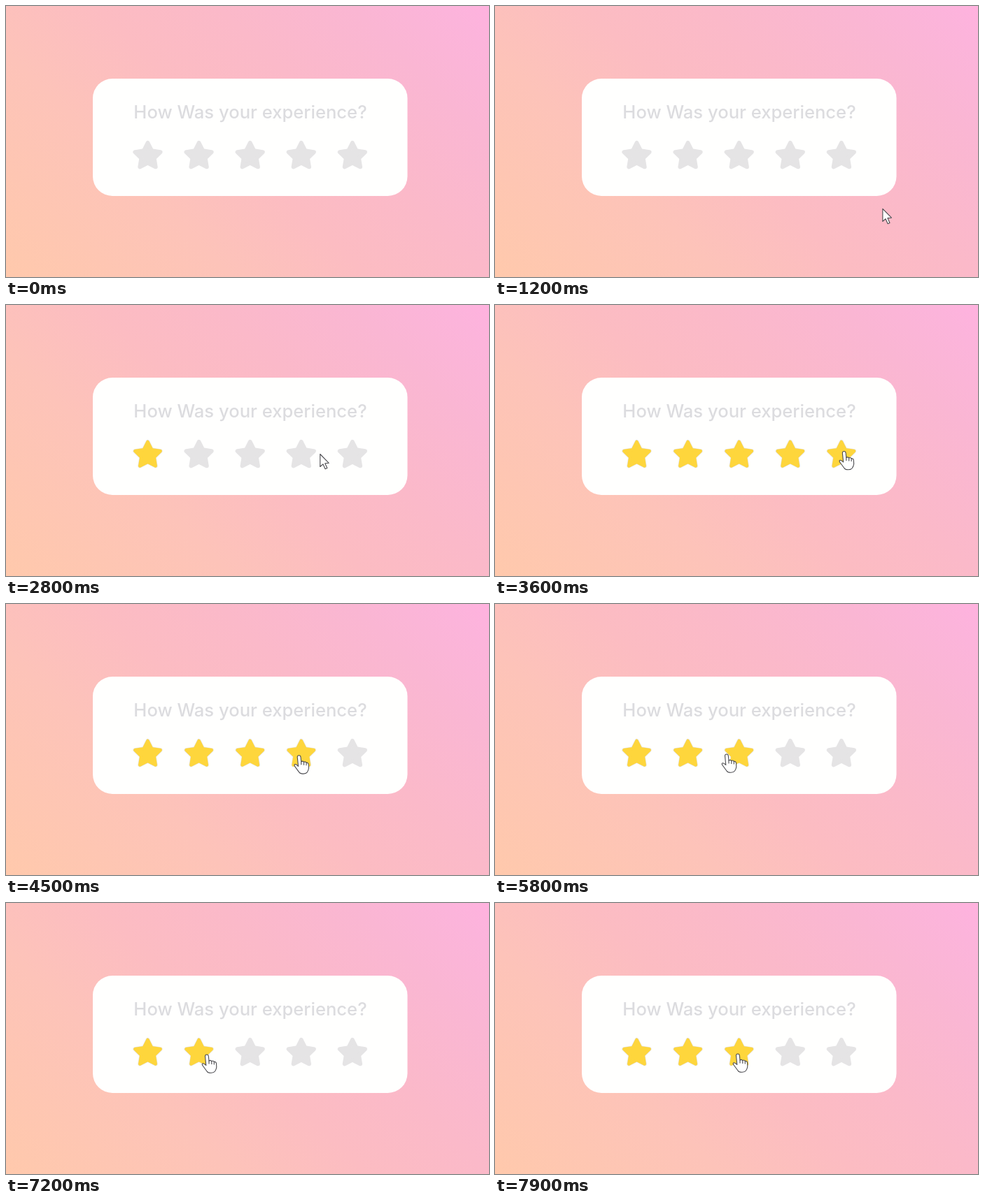
These frames come from a looping animation (690x388 px, 8000 ms). An HTML page:

```html
<!DOCTYPE html>
<html lang="en">
<head>
<meta charset="utf-8">
<title>Star rating</title>
<style>
  html, body { margin: 0; width: 100%; height: 100%; overflow: hidden; }
  body {
    background: linear-gradient(45deg, #ffc9ac 0%, #fdc3b9 30%, #fcbcc2 48%,
      #fbb9c9 64%, #fab6d3 82%, #fcb4db 94%, #ffb2df 100%);
  }
  svg { display: block; width: 690px; height: 388px; }
  text { font: 500 25.6px Inter, "Open Sans", sans-serif; fill: #dcdcdf; }
  .base { fill: #e5e4e5; stroke: #e5e4e5; stroke-width: 6; }
  .gold { fill: #fed63c; stroke: #fed63c; stroke-width: 4.6; }
  .base, .gold { stroke-linejoin: round; }
  .cursor path { fill: #fff; stroke: #4a4a4e; stroke-width: 1.1; stroke-linejoin: round; stroke-linecap: round; }
  .cursor .crease { fill: none; }
</style>
</head>
<body>
<svg viewBox="0 0 690 388">
  <rect x="124" y="104" width="449.5" height="168" rx="28" fill="#fffffe"/>
  <text x="349" y="160.5" text-anchor="middle">How Was your experience?</text>
  <g id="stars"></g>
  <g class="cursor" id="arrow">
    <path d="M.5 .5V18.5L4.6 14.8L7.8 21.8L10.6 20.5L7.5 13.7L13 13.3Z"/>
  </g>
  <g class="cursor" id="hand">
    <path d="M-2.5 2.5Q-2.5 0 0 0Q2 0 2.3 2.5L3 9Q5 7.5 6.8 9.5Q9 8.2 10.3 10.4Q13 9.8 13.5 13L13.8 18Q13.5 21 11.5 24Q10 26 6 26.3Q1.5 26.5 0 24L-5.5 16.5Q-7.8 13.5 -6 12.8Q-4 12.3 -1.2 15.5Z"/>
    <path class="crease" d="M3 9V13M6.8 9.5V13.5M10.3 10.4V14"/>
  </g>
</svg>
<script>
  const LOOP = 8000, STEP = 100;
  const STAR_Y = 215, starX = i => 202.5 + 73.1 * i;

  const smooth = p => (1 - Math.cos(Math.PI * p)) / 2;
  const out = p => 1 - (1 - p) ** 2.3;
  const launch = p => p ** 1.15;
  const dip = p => p ** 3;
  const linear = p => p;

  // start, end, x, y, upward arc, easing of x, easing of y
  const ENTRY = { t: 1100, x: 582, y: 290 };
  const moves = [
    [1100, 1900, 269, 258, 0, launch, dip],
    [1900, 2000, 227, 233, 0, linear],
    [2000, 2300, 202, 214, 0, out],
    [2600, 3000, 511, 214, 1, out],
    [3500, 3900, 428, 217, 7, smooth],
    [4400, 4900, 331, 215, 0, smooth],
    [5900, 6300, 257, 215, 7, smooth],
    [6500, 6900, 268, 217, 0, smooth],
    [7100, 7200, 287, 217, 0, linear],
    [7200, 7500, 347, 216, 8, out]
  ];

  // start, duration, first star, last star, lit
  const fades = [
    [2400, 200, 0, 0, 1],
    [3200, 200, 1, 4, 1],
    [4100, 200, 4, 4, 0],
    [5500, 300, 3, 3, 0],
    [6400, 200, 2, 2, 0],
    [7700, 200, 2, 2, 1]
  ];

  function starPoints(outer, inner) {
    return Array.from({ length: 10 }, (_, k) => {
      const r = k % 2 ? inner : outer, a = k * Math.PI / 5;
      return `${(r * Math.sin(a)).toFixed(2)},${(-r * Math.cos(a)).toFixed(2)}`;
    }).join(" ");
  }

  const $ = id => document.getElementById(id);
  const points = starPoints(19, 9.6);
  $("stars").innerHTML = Array.from({ length: 5 }, (_, i) =>
    `<g transform="translate(${starX(i)} ${STAR_Y})">
       <polygon class="base" points="${points}"/>
       <polygon class="gold" points="${points}"/>
     </g>`).join("");
  const golds = document.querySelectorAll(".gold");

  function cursorAt(t) {
    let { x, y } = ENTRY;
    for (const [start, end, toX, toY, arc, easeX, easeY = easeX] of moves) {
      if (t < start) break;
      const p = Math.min(1, (t - start) / (end - start));
      x += (toX - x) * easeX(p);
      y += (toY - y) * easeY(p) - arc * Math.sin(Math.PI * p);
    }
    return { x, y };
  }

  function litAt(t) {
    const lit = [0, 0, 0, 0, 0];
    for (const [start, length, first, last, to] of fades) {
      const p = Math.min(1, Math.max(0, (t - start) / length));
      for (let i = first; i <= last; i++) lit[i] += (to - lit[i]) * p;
    }
    return lit;
  }

  function draw(t) {
    litAt(t).forEach((v, i) => golds[i].style.opacity = v);
    const { x, y } = cursorAt(t);
    const visible = t >= ENTRY.t;
    const overStar = [0, 1, 2, 3, 4].some(i =>
      Math.abs(x - starX(i)) < 20 && Math.abs(y - STAR_Y) < 17);
    for (const [id, on] of [["arrow", !overStar], ["hand", overStar]]) {
      $(id).setAttribute("transform", `translate(${x} ${y})`);
      $(id).style.display = visible && on ? "" : "none";
    }
  }

  const begin = performance.now();
  function tick() {
    const t = (performance.now() - begin) % LOOP;
    draw(Math.floor(t / STEP) * STEP);
    requestAnimationFrame(tick);
  }
  tick();
</script>
</body>
</html>
```
